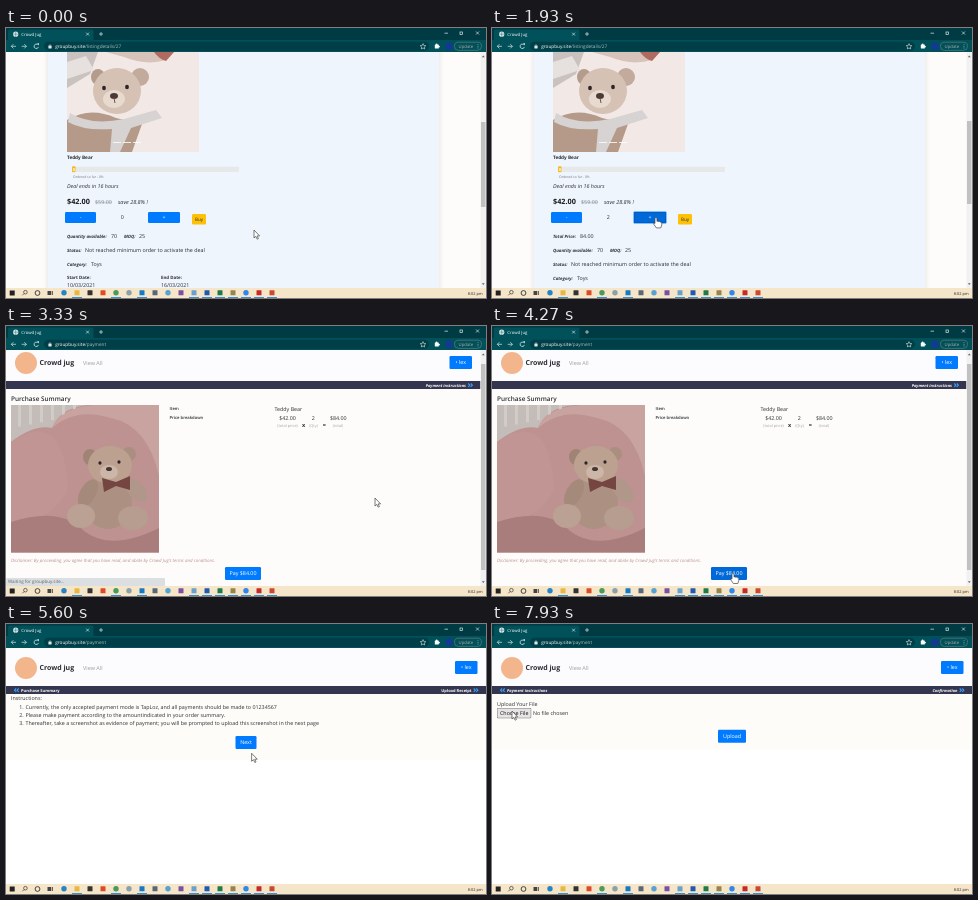
Recreate the animation shown at these times as an HTML page with a canvas. Size 480 by 270 pixels, loop 8 s.

```html
<!DOCTYPE html>
<html lang="en">
<head>
<meta charset="utf-8">
<title>Shop checkout</title>
<style>
html, body { margin: 0; width: 100%; height: 100%; overflow: hidden; background: #fff; }
canvas { display: block; width: 480px; height: 270px; }
</style>
</head>
<body>
<canvas id="stage"></canvas>
<script>
const LOOP = 8000;
const BRAND = 'Crowd Jug', Brand = 'Crowd jug';
const SANS = '"Open Sans", "Noto Sans", sans-serif';
const BLUE = '#007bff', BLUE_HOVER = '#0069d9', INK = '#2b2f33', GREY = '#8b9096';

const canvas = document.getElementById('stage');
const ratio = window.devicePixelRatio || 1;
canvas.width = 480 * ratio;
canvas.height = 270 * ratio;
const g = canvas.getContext('2d');
g.scale(ratio, ratio);
g.textRendering = 'geometricPrecision';

// Pointer stops: time, x, y
const STOPS = [
  [70, 248, 202], [750, 158, 189], [1750, 158, 189], [2450, 194, 191.5],
  [2900, 194, 191.5], [3330, 369, 172], [3450, 369, 172], [4250, 241, 247],
  [4850, 241, 247], [5750, 246, 120], [6600, 246, 120], [7500, 20, 87]
];
const CLICKS = [830, 1430];
const BUY_CLICK = 2800;
const PAGES = [[6200, uploadPage], [4600, instructionsPage], [3070, summaryPage], [0, listingPage]];

let mouse, hand;

function box(x, y, w, h, fill, r = 0) {
  g.fillStyle = fill;
  g.beginPath();
  g.roundRect(x, y, w, h, r);
  g.fill();
}

function oval(x, y, rx, ry, fill, turn = 0) {
  g.fillStyle = fill;
  g.beginPath();
  g.ellipse(x, y, rx, ry, turn, 0, 7);
  g.fill();
}

function line(pts, color, width = 0.7) {
  g.strokeStyle = color;
  g.lineWidth = width;
  g.beginPath();
  pts.forEach(([x, y]) => g.lineTo(x, y));
  g.stroke();
}

function shape(path, fill) {
  g.fillStyle = fill;
  g.fill(new Path2D(path));
}

function text(s, x, y, size = 5.33, color = INK, style = '', align = 'left') {
  g.font = `${style} ${size}px ${SANS}`;
  g.fillStyle = color;
  g.textAlign = align;
  g.fillText(s, x, y);
}

function hit(x, y, w, h) {
  return mouse.x >= x && mouse.x <= x + w && mouse.y >= y && mouse.y <= y + h;
}

function button(label, x, y, w, h, fill = BLUE, hover = BLUE_HOVER, color = '#fff', size = 5.33) {
  const over = hit(x, y, w, h);
  if (over) hand = true;
  box(x, y, w, h, over ? hover : fill, 1.2);
  text(label, x + w / 2, y + h / 2 + size * 0.36, size, color, '', 'center');
}

function pointerAt(t) {
  const i = STOPS.findIndex(s => s[0] > t);
  if (i === 0) return { x: STOPS[0][1], y: STOPS[0][2] };
  const a = STOPS[i < 0 ? STOPS.length - 1 : i - 1];
  if (i < 0) return { x: a[1], y: a[2] };
  const b = STOPS[i], u = (t - a[0]) / (b[0] - a[0]);
  const e = u * u * (3 - 2 * u);
  return { x: a[1] + (b[1] - a[1]) * e, y: a[2] + (b[2] - a[2]) * e };
}

function drawPointer() {
  const path = hand
    ? 'M-1 1Q0-.8 1 1V4Q2 3.2 2.8 4.3Q3.8 3.6 4.4 4.7Q5.6 4.2 5.8 5.6V7.5L4.8 10.5H.4L-2.4 6.6Q-2.6 5.2-1 6Z'
    : 'M0 0V8L1.8 6.4L3.2 9.2L4.4 8.6L3.1 5.9H5.6Z';
  g.save();
  g.translate(mouse.x, mouse.y);
  const p = new Path2D(path);
  g.fillStyle = '#fff';
  g.strokeStyle = '#444';
  g.lineWidth = 0.7;
  g.lineJoin = 'round';
  g.fill(p);
  g.stroke(p);
  g.restore();
}

function scrollbar(top, bottom) {
  box(474.5, 24, 5.5, 236, '#f1f1f1');
  box(475, top, 4.5, bottom - top, '#c1c1c1');
  shape('M475.8 29.3L477.3 27.5L478.8 29.3Z', '#666');
  shape('M475.8 255.2L477.3 257L478.8 255.2Z', '#666');
}

function clip(x, y, w, h, draw) {
  g.save();
  g.beginPath();
  g.rect(x, y, w, h);
  g.clip();
  draw();
  g.restore();
}

function closeBear() {
  box(61, 24, 132, 100, '#f2e9e7');
  shape('M61 24H92L84 46L61 60Z', '#c9c2be');
  shape('M61 34L80 28L88 42L61 51Z', '#e6e1de');
  shape('M100 24H168L160 32Q140 38 118 29Z', '#d8c3ba');
  shape('M148 24H168L160 33Q153 31 148 24Z', '#b06a60');
  shape('M61 92Q84 78 110 90L136 96L126 124H61Z', '#b59a8a');
  oval(92, 49, 7, 8, '#b49c8c');
  oval(134, 49, 9, 9, '#c2ab9c');
  oval(111, 63, 24, 23, '#d6c2b4');
  oval(108, 71, 11, 9, '#e8dacf');
  oval(108, 68, 4, 3, '#4d3a35');
  oval(98, 60, 1.9, 2.2, '#2c2425');
  oval(121, 59, 1.9, 2.2, '#2c2425');
  line([[108, 70], [109, 75]], '#6a544a', 1);
  shape('M64 85Q85 98 118 91L150 82L156 90L125 100L114 124H104L106 101Q78 103 62 94Z', '#d6d3d2');
}

function chairBear() {
  box(5, 79, 148, 148, '#bd9290');
  shape('M5 79H82Q54 82 46 102Q28 98 5 116Z', '#c4bcb8');
  for (let x = 12; x < 70; x += 11) box(x, 79, 3, 24 - x / 5, '#d2ccc9');
  shape('M82 79H153V138Q142 90 82 79Z', '#b08e8b');
  shape('M46 102Q70 81 105 92Q142 100 153 150V79H88Q54 82 46 102Z', '#c9a3a0');
  shape('M5 116Q32 97 48 112Q60 126 62 163Q48 194 5 200Z', '#c19593');
  shape('M5 196Q55 180 78 205Q105 226 153 202V227H5Z', '#a97d7b');
  oval(84, 131, 7, 8, '#a08375');
  oval(123, 128, 7, 7, '#aa8e80');
  oval(102, 177, 24, 26, '#ac9082');
  oval(82, 167, 8, 15, '#a5897b', 0.5);
  oval(130, 164, 8, 15, '#b0978a', -0.7);
  oval(75, 190, 14, 12, '#baa193');
  oval(127, 192, 15, 12, '#b79d8f');
  oval(104, 139, 22, 19, '#bca191');
  oval(103, 146, 9, 7, '#ccb6a8');
  oval(103, 143, 3, 2, '#453533');
  oval(94, 137, 1.6, 1.8, '#2c2425');
  oval(113, 136, 1.6, 1.8, '#2c2425');
  shape('M96 152L110 156L124 150V164L110 160L98 166Z', '#744541');
}

function listingPage(t) {
  const count = CLICKS.filter(c => t >= c).length;
  box(0, 24, 480, 236, '#fdfcfa');
  g.save();
  g.shadowColor = 'rgba(60,60,80,.16)';
  g.shadowBlur = 5 * ratio;
  box(42, 15, 391, 260, '#eff5fd');
  g.restore();
  clip(61, 24, 132, 100, closeBear);
  [107, 117, 127].forEach(x => box(x, 114, 8, 0.8, '#fff'));

  text('Teddy Bear', 61, 131, 4.7, INK, 'bold');
  box(66, 138.7, 167, 5.3, '#e6e8ea', 1);
  box(66, 138.2, 3.5, 6, '#f5b921', 1);
  text('0', 68, 143, 4, '#fff', 'bold', 'center');
  text('Ordered so far - 0%', 67, 149.7, 3.4, '#777');
  text('Deal ends in 16 hours', 61, 160, 5.4, INK, 'italic');
  text('$42.00', 61, 176, 7.3, '#17191b', 'bold');
  text('$59.00', 89, 176, 5.4, GREY);
  line([[89, 174.2], [106, 174.2]], GREY, 0.5);
  text('save 28.8% !', 112, 176, 5.5, INK, 'italic');

  button('-', 59, 184, 31, 11);
  if (count) box(141, 183, 34, 13, '#7fbdff', 2);
  button('+', 142, 184, 32, 11, count ? '#0069d9' : BLUE);
  if (count) {
    g.strokeStyle = '#0056b3';
    g.lineWidth = 0.6;
    g.strokeRect(142.3, 184.3, 31.4, 10.4);
  }
  text(String(count), 116.3, 190.8, 5.33, INK, '', 'center');
  button('Buy', 186, 186, 14, 10.5, '#ffc107', '#e0a800', INK, 4.6);
  if (t >= BUY_CLICK) hand = false;

  const label = (s, x, y) => text(s, x, y, 4.4, INK, 'italic bold');
  let y = 210;
  if (count) {
    label('Total Price:', 61, y);
    text((42 * count).toFixed(2), 88, y);
    y += 14;
  }
  label('Quantity available:', 61, y);
  text('70', 105, y);
  label('MOQ:', 118, y);
  text('25', 133, y);
  label('Status:', 61, y + 14);
  text('Not reached minimum order to activate the deal', 79, y + 14);
  label('Category:', 61, y + 28);
  text('Toys', 85, y + 28);
  text('Start Date:', 61, y + 41, 4.4, INK, 'bold');
  text('End Date:', 155, y + 41, 4.4, INK, 'bold');
  text('10/03/2021', 61, y + 49);
  text('16/03/2021', 155, y + 49);
  scrollbar(count ? 93 : 94, count ? 176 : 179);
}

function chevrons(x, y, dir) {
  for (const d of [-1.3, 1.2]) {
    line([[x + d - dir, y - 1.7], [x + d + dir * 0.7, y], [x + d - dir, y + 1.7]], '#39a0ff', 1.1);
  }
}

function header(dy, right, back, next, style) {
  box(0, 24, 480, 39 + dy, '#fcfcfe');
  oval(20, 44 + dy, 11, 11, '#f3b58c');
  text(Brand, 33.5, 45.6 + dy, 7, '#2c2d33', 'bold');
  text('View All', 77, 45.7 + dy, 5.5, '#999ca1');
  button('• lex', right - 31, 37 + dy, 22.5, 13);
  box(0, 62 + dy, right, 8, '#34354f');
  const y = 67.7 + dy;
  if (back) {
    chevrons(10.5, 66.2 + dy, -1);
    text(back, 15, y, 4, '#fff', style);
  }
  text(next, right - 14.5, y, 4, '#fff', style, 'right');
  chevrons(right - 10, 66.2 + dy, 1);
}

function summaryPage(t) {
  box(0, 24, 480, 236, '#fefcfa');
  header(-7, 474.5, '', 'Payment instructions', 'italic bold');
  text('Purchase Summary', 5, 74.5, 6.4, INK, '600');
  clip(5, 79, 148, 147.5, chairBear);
  text('Item', 163.5, 84.3, 4.2, INK, '600');
  text('Price breakdown', 163.5, 92.5, 4.2, INK, '600');
  text('Teddy Bear', 268.5, 85);
  const mid = (s, x, y, ...rest) => text(s, x, y, ...rest, '', 'center');
  mid('$42.00', 281.5, 93.5, 5.33, INK);
  mid('2', 307.3, 93.5, 5.33, INK);
  mid('$84.00', 332.3, 93.5, 5.33, INK);
  mid('(total price)', 281.5, 100.8, 3.9, '#a5a5a8');
  mid('(Qty)', 307.5, 100.8, 3.9, '#a5a5a8');
  mid('(total)', 332, 100.8, 3.9, '#a5a5a8');
  text('x', 297.5, 100.8, 5.5, INK, 'bold', 'center');
  text('=', 318.2, 100.8, 5.5, INK, 'bold', 'center');
  text(`Disclaimer: By proceeding, you agree that you have read, and abide by ${BRAND}'s terms and conditions.`,
    5, 236, 4.45, '#b98f90', 'italic');
  button('Pay $84.00', 219, 241, 36, 13);
  scrollbar(38, 244);
  if (t < 3600) {
    box(0, 252, 159, 8, '#dcdfe2', 1);
    text('Waiting for groupbuy.site...', 2, 257.3, 4.5, '#606469');
  }
}

function blankPage(creamEnd) {
  box(0, 24, 480, 236, '#fff');
  box(0, 69, 480, creamEnd - 69, '#fefcf8');
}

function instructionsPage() {
  blankPage(136);
  header(0, 480, 'Purchase Summary', 'Upload Receipt', 'bold');
  text('Instructions:', 5, 76);
  [
    'Currently, the only accepted payment mode is TapLoz, and all payments should be made to 01234567',
    'Please make payment according to the amountindicated in your order summary.',
    'Thereafter, take a screenshot as evidence of payment; you will be prompted to upload this screenshot in the next page'
  ].forEach((s, i) => {
    text(`${i + 1}.`, 17.6, 84.5 + i * 8.4, 5.33, INK, '', 'right');
    text(s, 19.5, 84.5 + i * 8.4);
  });
  button('Next', 229.5, 112, 21, 13);
}

function uploadPage() {
  blankPage(126);
  header(0, 480, 'Payment instructions', 'Confirmation', 'italic bold');
  text('Upload Your File', 5, 81.6);
  const over = hit(5, 84, 34, 10);
  box(5, 84, 34.2, 10.2, '#767676', 1);
  box(5.5, 84.5, 33.2, 9.2, over ? '#e5e5e5' : '#efefef', 0.7);
  text('Choose File', 8, 91, 5.33, '#111');
  text('No file chosen', 41, 91);
  button('Upload', 226, 105.7, 28, 13);
}

function browser(url) {
  const pale = '#dbe7e8';
  box(0, 0, 480, 24, '#003b43');
  box(2, 1.5, 85.5, 12, '#00515a', 2);
  box(0, 12, 480, 12, '#00515a');
  box(38, 13.7, 385, 9.2, '#003f47', 4.6);

  oval(9.7, 6.2, 2.6, 2.6, pale);
  line([[7.3, 6.2], [12.1, 6.2]], '#00515a', 0.4);
  line([[9.7, 3.7], [9.7, 8.7]], '#00515a', 0.4);
  text(BRAND, 15.3, 7.8, 4.3, '#fff');
  line([[80.2, 4.7], [83, 7.5]], pale);
  line([[83, 4.7], [80.2, 7.5]], pale);
  line([[93, 6], [97, 6]], pale);
  line([[95, 4], [95, 8]], pale);
  line([[438.5, 5.2], [442, 5.2]], pale);
  g.strokeRect(454, 4, 2.6, 2.6);
  line([[470, 3.5], [473, 6.5]], pale);
  line([[473, 3.5], [470, 6.5]], pale);

  line([[10, 18.3], [5.3, 18.3], [7.4, 16.2]], pale);
  line([[5.3, 18.3], [7.4, 20.4]], pale);
  line([[15.7, 18.3], [20.4, 18.3], [18.3, 16.2]], pale);
  line([[20.4, 18.3], [18.3, 20.4]], pale);
  g.strokeStyle = pale;
  g.lineWidth = 0.8;
  g.beginPath();
  g.arc(30.3, 18.3, 2.2, 0.3, 5.5);
  g.stroke();
  shape('M31 15.2H33V17.6Z', pale);
  box(42.4, 17.8, 3.2, 2.6, pale, 0.3);
  g.lineWidth = 0.6;
  g.beginPath();
  g.arc(44, 17.8, 1, Math.PI, 0);
  g.stroke();
  text('groupbuy.site', 49.2, 20, 4.7, '#fff');
  const w = g.measureText('groupbuy.site').width;
  text(url, 49.2 + w, 20, 4.7, '#a9c0c2');

  g.lineWidth = 0.6;
  g.stroke(new Path2D('M417 15.6L417.8 17.5L419.8 17.7L418.3 19L418.7 21L417 20L415.3 21L415.7 19L414.2 17.7L416.2 17.5Z'));
  box(428.8, 16.6, 4, 4, '#fff', 0.5);
  oval(430.6, 16.3, 0.9, 0.9, '#fff');
  oval(433, 18.6, 0.9, 0.9, '#fff');
  oval(443, 18.4, 3.8, 3.8, '#123a93');
  g.strokeStyle = '#8f8a84';
  g.lineWidth = 0.5;
  g.beginPath();
  g.roundRect(448.5, 14.2, 27, 8.2, 4);
  g.stroke();
  text('Update', 452.5, 19.9, 4.3, '#b3aaa4');
  for (const y of [16.6, 18.3, 20]) oval(472, y, 0.45, 0.45, pale);
}

function taskbar() {
  box(0, 260, 480, 10, '#f5e6ca');
  box(3.7, 262.5, 5, 5, '#222');
  g.strokeStyle = '#333';
  g.lineWidth = 0.7;
  g.beginPath();
  g.arc(19.4, 264.2, 1.8, 0, 7);
  g.stroke();
  line([[18, 265.6], [16.3, 267.3]], '#333');
  g.lineWidth = 0.9;
  g.beginPath();
  g.arc(31.5, 265, 2.4, 0, 7);
  g.stroke();
  box(41.5, 263, 3.8, 4, '#444');
  box(46, 263, 0.8, 4, '#444');
  const colors = ['#2384c6', '#e8b843', '#333', '#dc4a2a', '#4a9a58', '#8ba0ad', '#1779c4', '#586878',
    '#55a2d4', '#7851a4', '#6ba0cb', '#2259b0', '#207a48', '#98834a', '#2f86eb', '#c62a28', '#cc4931'];
  const open = [1, 4, 6, 10, 11, 12, 13, 14, 15, 16];
  colors.forEach((c, i) => {
    const x = 58 + i * 13;
    if ([0, 4, 5, 8, 14].includes(i)) oval(x, 264.8, 2.7, 2.7, c);
    else box(x - 2.5, 262.3, 5, 5, c, 0.4);
    if (open.includes(i)) box(x - 5, 269, 10, 1, '#3b91cf');
  });
  text('8:02 pm', 476.5, 266.5, 3.9, '#222', '', 'right');
}

function draw(t) {
  mouse = pointerAt(t);
  hand = false;
  const [start, page] = PAGES.find(p => t >= p[0]);
  page(t);
  browser(start ? '/payment' : '/listingdetails/27');
  taskbar();
  drawPointer();
}

const began = performance.now();
function frame() {
  draw((performance.now() - began) % LOOP);
  requestAnimationFrame(frame);
}
frame();
</script>
</body>
</html>
```
